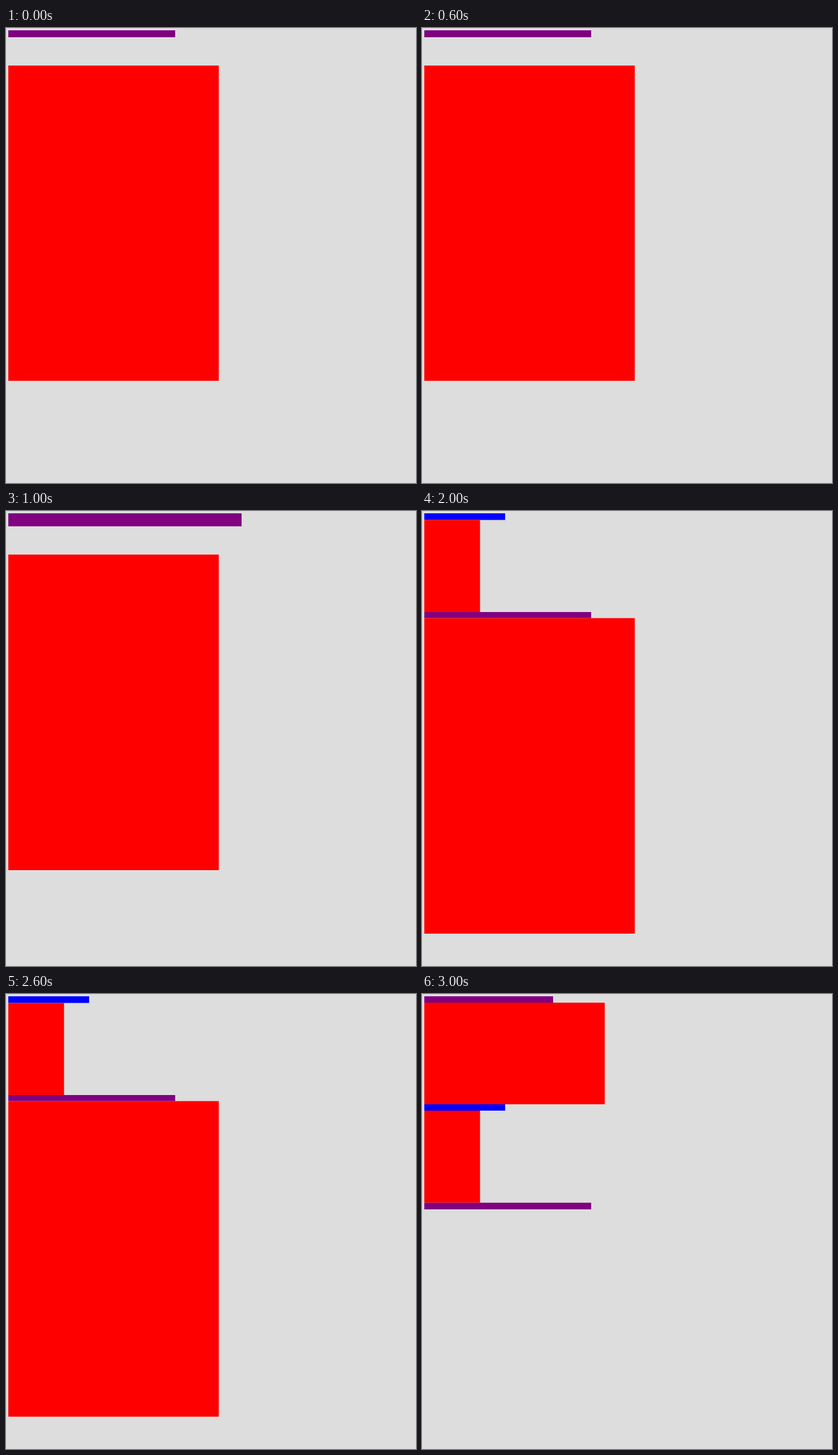
Write an HTML page with a canvas that moves like this. It is 710 px wide and 788 px high and loops after 4 s.

```html
<!DOCTYPE html>
<html lang="en">
<head>
<meta charset="utf-8">
<title>Stacked blocks</title>
<style>
html, body { margin: 0; width: 100%; height: 100%; overflow: hidden; background: #ddd; }
canvas { display: block; }
</style>
</head>
<body>
<canvas id="stage" width="710" height="788"></canvas>
<script>
const ctx = document.getElementById('stage').getContext('2d');
const LEFT = 4, STEP = 1000;
const RED = '#f00', BLUE = '#00f', PURPLE = '#800080';

// Each block: colour, right edge, top, bottom
const scenes = [
  [[PURPLE, 293, 4, 16], [RED, 368.5, 65, 611]],
  [[PURPLE, 408, 4, 26.5], [RED, 368.5, 75.5, 622]],
  [[BLUE, 144, 4, 15.5], [RED, 100.5, 15.5, 175], [PURPLE, 293, 175, 185.5], [RED, 368.5, 185.5, 732]],
  [[PURPLE, 227, 4, 15], [RED, 316.5, 15, 191], [BLUE, 144, 191, 202], [RED, 100.5, 202, 361.5], [PURPLE, 293, 361.5, 373]]
];

function draw(now) {
  const scene = scenes[Math.floor(now / STEP) % scenes.length];
  ctx.fillStyle = '#ddd';
  ctx.fillRect(0, 0, 710, 788);
  for (const [color, right, top, bottom] of scene) {
    ctx.fillStyle = color;
    ctx.fillRect(LEFT, top, right - LEFT, bottom - top);
  }
}

function tick() {
  draw(performance.now());
  requestAnimationFrame(tick);
}
tick();
</script>
</body>
</html>
```
